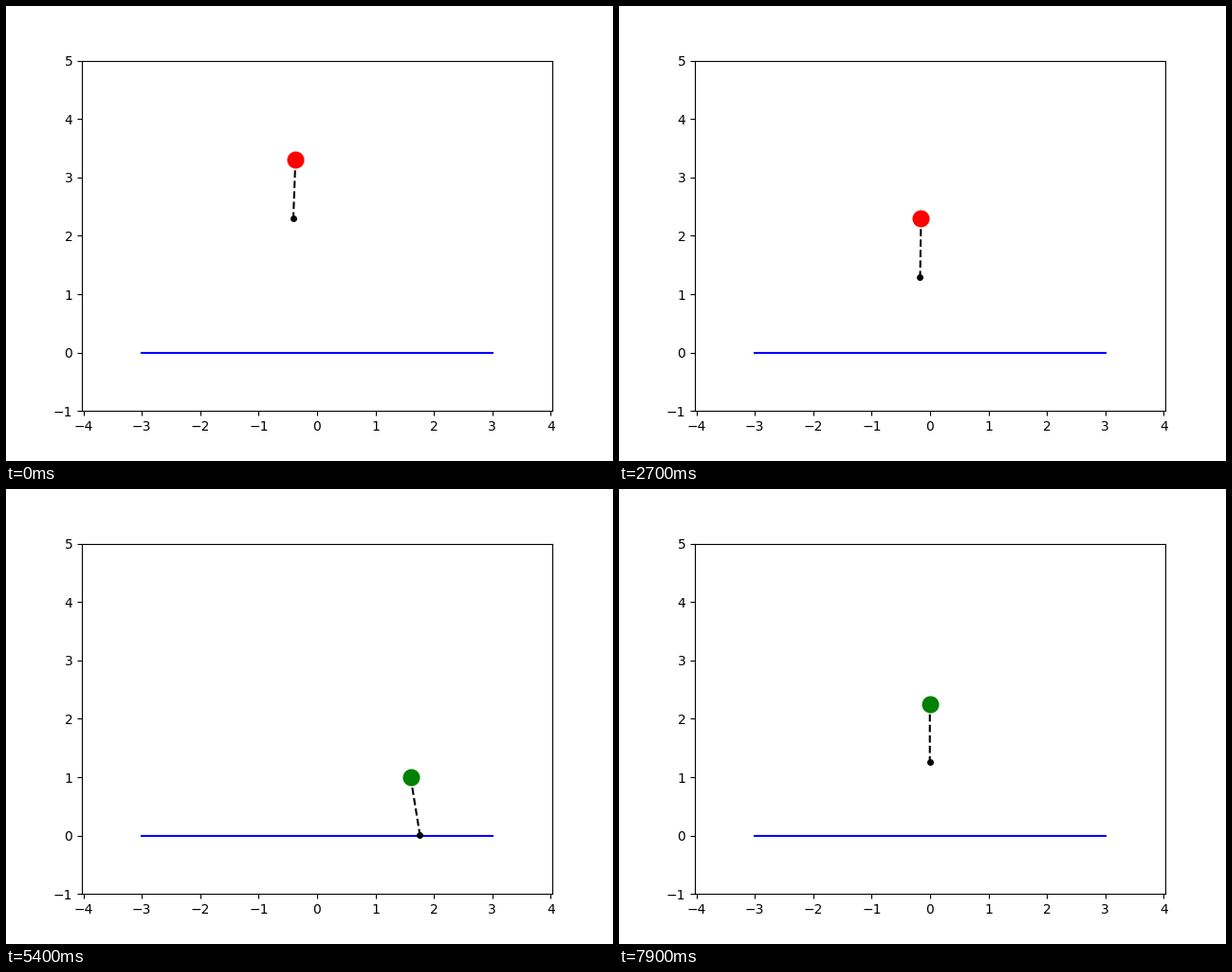
These frames come from a looping animation (640x480 px, 8 s). A matplotlib script:

```python
import numpy as np
import matplotlib.pyplot as plt
from matplotlib.animation import FuncAnimation

FPS, FRAMES = 10, 80
HALF_G = 9.81 / 2
SWITCH = 4.6  # the second run starts here


class Flight:
    """Ballistic arc: apex time and height, one known x, constant speed."""

    def __init__(self, apex_t, apex_y, ref_t, ref_x, vx):
        self.apex_t, self.apex_y = apex_t, apex_y
        self.ref_t, self.ref_x, self.vx = ref_t, ref_x, vx
        self.liftoff, self.touchdown = self.contact(-1), self.contact(1)

    def mass(self, t):
        x = self.ref_x + self.vx * (t - self.ref_t)
        return x, self.apex_y - HALF_G * (t - self.apex_t) ** 2

    def contact(self, side):
        t = self.apex_t
        for _ in range(4):
            height = np.cos(lean(self.mass(t)[0]))
            t = self.apex_t + side * np.sqrt((self.apex_y - height) / HALF_G)
        return t

    def speed(self, t):
        return 2 * HALF_G * abs(t - self.apex_t)


RUNS = (
    ("red", None),
    ("green", None),
)


def lean(x):
    return 0.1 * x


RED = [
    Flight(-0.107, 3.356, 0.0, -0.37, -3.21),
    Flight(1.43, 2.57, 1.5, -1.145, 1.72),
    Flight(2.79, 2.335, 2.7, -0.155, 0.23),
    Flight(4.05, 2.143, 4.3, -0.012, 0.0),
]
GREEN = [
    Flight(4.70, 3.40, 4.6, 1.745, -0.18),
    Flight(6.30, 2.785, 6.4, 0.655, -1.3),
    Flight(7.706, 2.44, 7.9, -0.004, 0.0),
]


def stance(t, before, after):
    """Foot pinned, leg squeezed like a spring between two flights."""
    start, end = before.touchdown, after.liftoff
    s = (t - start) / (end - start)
    x0, x1 = before.mass(start)[0], after.mass(end)[0]
    foot_x = x0 + np.sin(lean(x0))
    tilt = (1 - s) * (foot_x - x0) + s * (foot_x - x1)
    speed = (1 - s) * before.speed(start) + s * after.speed(end)
    length = 1 - (end - start) / np.pi * np.sin(np.pi * s) * speed
    mass = foot_x - length * tilt, length * np.sqrt(1 - tilt ** 2)
    return mass, (foot_x, 0.0)


def pose(t):
    flights = RED if t < SWITCH - 1e-6 else GREEN
    for before, after in zip(flights, flights[1:]):
        if before.touchdown <= t < after.liftoff:
            return stance(t, before, after)
    flight = [f for i, f in enumerate(flights) if i == 0 or f.liftoff <= t][-1]
    x, y = flight.mass(t)
    angle = lean(x)
    return (x, y), (x + np.sin(angle), y - np.cos(angle))


fig, ax = plt.subplots(figsize=(6.4, 4.8), dpi=100)
half_width = 3 * 496 / 369.6  # equal scale on both axes
ax.set_xlim(-half_width, half_width)
ax.set_ylim(-1, 5)

ax.plot([-3, 3], [0, 0], "b-", lw=1.5)
leg, = ax.plot([], [], "k--", lw=1.5)
body, = ax.plot([], [], "o", color="red", ms=12)
foot, = ax.plot([], [], "ko", ms=4)


def draw(i):
    t = i / FPS
    (mx, my), (fx, fy) = pose(t)
    leg.set_data([mx, fx], [my, fy])
    body.set_data([mx], [my])
    body.set_color("red" if t < SWITCH - 1e-6 else "green")
    foot.set_data([fx], [fy])
    return leg, body, foot


anim = FuncAnimation(fig, draw, frames=FRAMES, interval=1000 / FPS, repeat=True)
plt.show()
```
